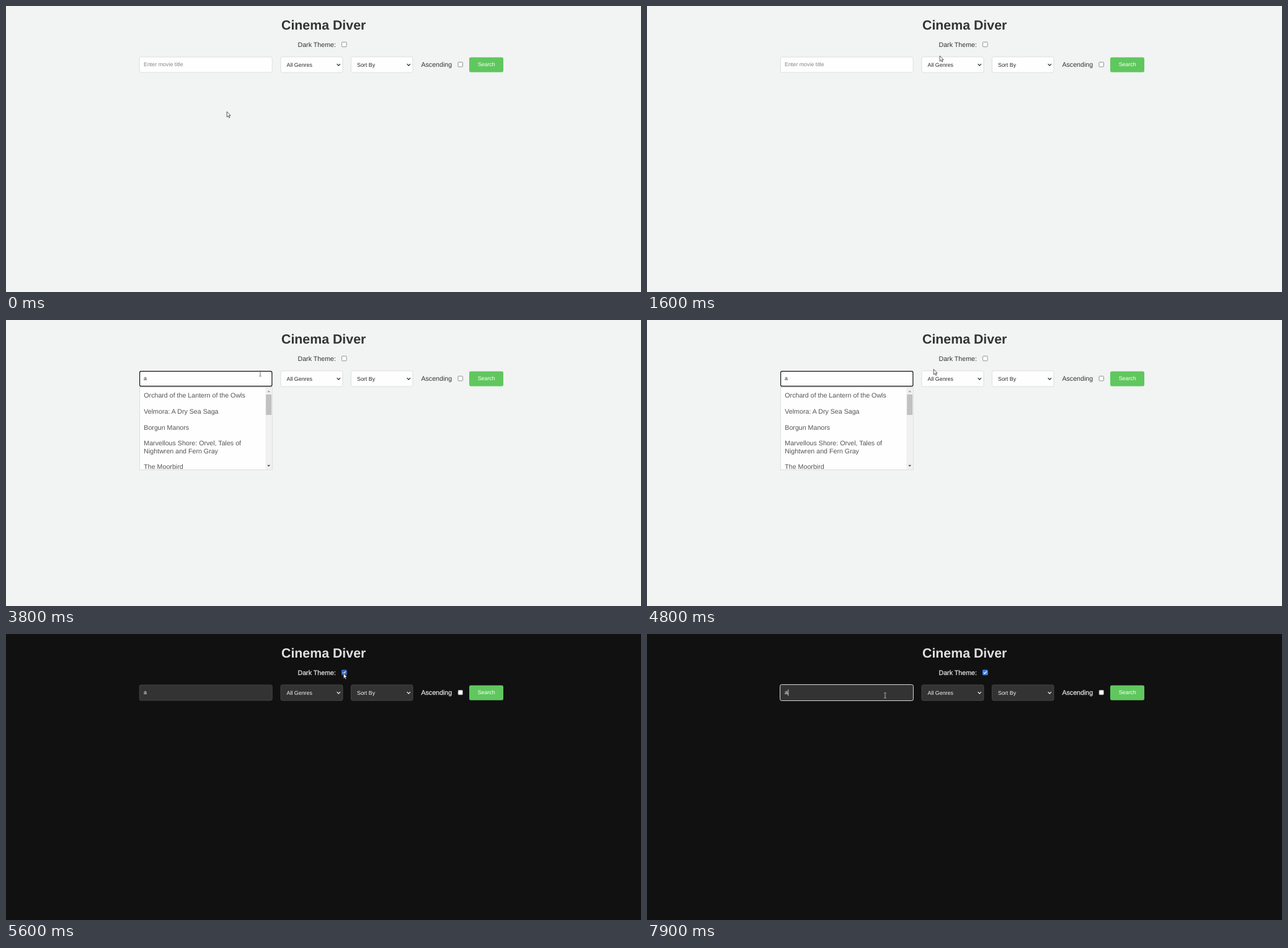
Animation, 1024 px wide and 461 px high, one loop 8000 ms. Source, as an HTML page:

```html
<!DOCTYPE html>
<html lang="en">
<head>
<meta charset="utf-8">
<title>Film search</title>
<style>
  html, body { margin: 0; width: 100%; height: 100%; overflow: hidden; }
  svg { display: block; width: 100vw; height: 100vh; font: 10.667px "Liberation Sans", Arial, sans-serif; text-rendering: geometricPrecision; }

  /* every animation shares one 8 s clock; 1.25% is 100 ms */
  svg, .ring, .caret, .hint, .typed, .list, .tick, .tick rect, .cursor, .arrow, .beam {
    animation: 8s step-end infinite;
  }
  svg { animation-name: theme; background: var(--bg); }
  .ring { fill: none; }
  .day { animation-name: day-ring; stroke: #161616; stroke-width: 1.2; }
  .night { animation-name: night-ring; stroke: #d0d0d0; }
  .caret { animation-name: caret; fill: var(--field-ink); }
  .hint { animation-name: hint; fill: #858585; }
  .typed { animation-name: typed; fill: var(--field-ink); }
  .list { animation-name: list; }
  .tick { animation-name: tick; }
  .tick rect { animation-name: hover; }
  .cursor { animation-name: move; }
  .arrow { animation-name: arrow; fill: #fff; stroke: var(--edge); stroke-width: .8; }
  .beam { animation-name: beam; fill: none; stroke: var(--beam); stroke-width: .9; }

  .title { font-size: 21.333px; font-weight: 700; fill: var(--title); }
  .label { fill: var(--ink); stroke: var(--ink); stroke-width: var(--heft); }
  .small { font-size: 8.889px; }
  .pick { fill: var(--field-ink); }
  .field { fill: var(--field); stroke: var(--line); stroke-width: .9; }
  .chevron { fill: none; stroke: var(--field-ink); stroke-width: 1.3; }
  .check { fill: #fff; stroke: #777; stroke-width: .8; }
  .items { fill: #555; }

  @keyframes theme {
    0% {
      --bg: #f1f4f3; --title: #333; --ink: #333; --heft: 0; --field: #fefefe; --line: #d9dcdb;
      --field-ink: #2b2b2b; --beam: #666; --edge: #333;
    }
    70%, 100% {
      --bg: #111; --title: #e0e0e0; --ink: #e4e4e4; --heft: .25; --field: #333; --line: #484848;
      --field-ink: #f2f2f2; --beam: #bbb; --edge: #111;
    }
  }
  @keyframes day-ring { 0%, 66.25%, 100% { opacity: 0; } 27.5% { opacity: 1; } }
  @keyframes night-ring { 0% { opacity: 0; } 85%, 100% { opacity: 1; } }
  @keyframes caret {
    0%, 33.75% { opacity: 0; transform: none; }
    27.5% { opacity: 1; transform: none; }
    37.5%, 51.25%, 85%, 98.75%, 100% { opacity: 1; transform: translateX(4.8px); }
    45%, 57.5%, 92.5% { opacity: 0; transform: translateX(4.8px); }
  }
  @keyframes hint { 0% { opacity: 1; } 37.5%, 100% { opacity: 0; } }
  @keyframes typed { 0% { opacity: 0; } 37.5%, 100% { opacity: 1; } }
  @keyframes list { 0%, 70%, 100% { opacity: 0; } 47.5% { opacity: 1; } }
  @keyframes tick { 0% { opacity: 0; } 70%, 100% { opacity: 1; } }
  @keyframes hover { 0% { fill: #3465c0; } 77.5%, 100% { fill: #3f7ee4; } }
  @keyframes arrow { 0%, 60% { opacity: 1; } 22.5%, 82.5%, 100% { opacity: 0; } }
  @keyframes beam { 0%, 60% { opacity: 0; } 22.5%, 82.5%, 100% { opacity: 1; } }
  @keyframes move {
    0% { transform: translate(356px, 170px); animation-timing-function: steps(3); }
    3.75% { transform: translate(385px, 155px); animation-timing-function: steps(3); }
    7.5% { transform: translate(455px, 108px); animation-timing-function: steps(3); }
    11.25% { transform: translate(485px, 86px); }
    17.5% { transform: translate(483px, 84px); }
    18.75% { transform: translate(479px, 81px); }
    20% { transform: translate(472px, 80px); }
    21.25% { transform: translate(440px, 82px); }
    22.5% { transform: translate(410px, 86.5px); }
    58.75% { transform: translate(424px, 86px); }
    60% { transform: translate(462px, 79px); }
    61.25% { transform: translate(508px, 69px); }
    62.5% { transform: translate(536px, 63px); }
    63.75% { transform: translate(544px, 63px); }
    77.5% { transform: translate(540px, 64px); }
    78.75% { transform: translate(522px, 70px); }
    80% { transform: translate(480px, 82px); }
    81.25% { transform: translate(435px, 92px); }
    82.5% { transform: translate(400px, 98px); }
    83.75%, 100% { transform: translate(384px, 99px); }
  }
</style>
</head>
<body>
<svg viewBox="0 0 1024 461">
  <text class="title" x="444" y="38">Cinema Diver</text>
  <text class="label" x="470.5" y="65.6">Dark Theme:</text>
  <rect class="check" x="541.5" y="58.2" width="7.6" height="7.6" rx="1.2"/>
  <g class="tick">
    <rect x="541" y="57.7" width="8.6" height="8.6" rx="1.3"/>
    <path d="M543 62.2l1.7 1.7 3.1-3.7" fill="none" stroke="#fff" stroke-width="1.2"/>
  </g>

  <rect class="field" x="215.2" y="82.2" width="214" height="24.8" rx="2.5"/>
  <rect class="ring day" x="215.6" y="82.6" width="213.3" height="24.1" rx="2.3"/>
  <rect class="ring night" x="214.5" y="81.5" width="215" height="26" rx="2.8"/>
  <g class="small">
    <text class="hint" x="222" y="97.2">Enter movie title</text>
    <text class="typed" x="222" y="97.2">a</text>
  </g>
  <rect class="caret" x="222.4" y="89.5" width=".9" height="10"/>

  <rect class="field" x="443" y="82" width="100" height="25.2" rx="2.5"/>
  <rect class="field" x="556.4" y="82" width="99.6" height="25.2" rx="2.5"/>
  <g class="small pick">
    <text x="452.5" y="97.6">All Genres</text>
    <text x="566" y="97.6">Sort By</text>
  </g>
  <path class="chevron" d="M533.6 93.4l2.7 2.7 2.7-2.7M646.6 93.4l2.7 2.7 2.7-2.7"/>

  <text class="label" x="669.4" y="98">Ascending</text>
  <rect class="check" x="729" y="90.5" width="7.5" height="7.5" rx="1.2"/>
  <rect x="747" y="82.7" width="55" height="24" rx="2.6" fill="#60c75e"/>
  <text class="small" x="774.7" y="97.2" text-anchor="middle" fill="#fff">Search</text>

  <g class="list">
    <rect x="215.4" y="108.4" width="214.2" height="133.2" fill="#fefefe" stroke="#d4d6d5" stroke-width=".8"/>
    <clipPath id="inner"><rect x="216" y="109" width="203" height="132.2"/></clipPath>
    <g class="items" clip-path="url(#inner)">
      <text x="222.3" y="125.4">Orchard of the Lantern of the Owls</text>
      <text x="222.3" y="151">Velmora: A Dry Sea Saga</text>
      <text x="222.3" y="176.7">Borgun Manors</text>
      <text x="222.3" y="202.3">Marvellous Shore: Orvel, Tales of</text>
      <text x="222.3" y="214.6">Nightwren and Fern Gray</text>
      <text x="222.3" y="240.2">The Moorbird</text>
    </g>
    <rect x="418.3" y="109" width="10.9" height="132.2" fill="#f1f1f1"/>
    <rect x="419.2" y="120" width="9" height="33" fill="#c1c1c1"/>
    <path d="M421.2 116.2l2.5-2.7 2.5 2.7z" fill="#a3a3a3"/>
    <path d="M421.2 233.8l2.5 2.7 2.5-2.7z" fill="#505050"/>
  </g>

  <g class="cursor">
    <path class="arrow" d="M.2.3V9l2-1.8 1.4 3 1.4-.6-1.4-3H6.2z"/>
    <path class="beam" d="M-2-4H-.5L0-3.6.5-4H2M0-3.6V3.6M-2 4H-.5L0 3.6.5 4H2"/>
  </g>
</svg>
</body>
</html>
```
